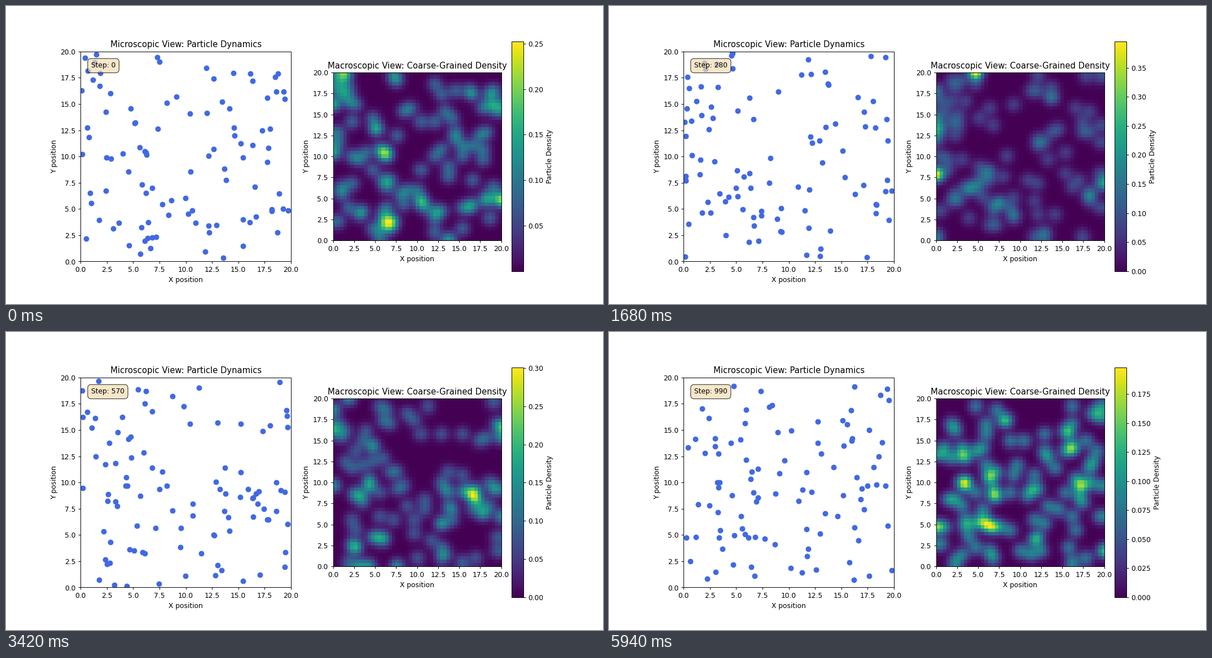
These frames come from a looping animation (1058 px wide and 529 px high, 6000 ms). A matplotlib script:

```python
import numpy as np
import matplotlib.pyplot as plt
from matplotlib.animation import FuncAnimation

COUNT = 100
BOX = 20.0
EDGES = np.linspace(0, BOX, 50)
BINS = len(EDGES) - 1
SMOOTHING = 1.5
DT = 0.02
FRICTION = 1.0
TEMPERATURE = 1.0
STEPS_PER_FRAME = 10
FRAMES = 100


def simulate():
    """Langevin paths in a periodic box, one array of positions per frame."""
    np.random.seed(42)
    position = np.random.rand(COUNT, 2) * BOX
    velocity = np.random.randn(COUNT, 2) * np.sqrt(TEMPERATURE)
    kick = np.sqrt(2 * FRICTION * TEMPERATURE * DT)
    path = [position]
    for _ in range(1, FRAMES):
        for _ in range(STEPS_PER_FRAME):
            noise = np.random.randn(COUNT, 2)
            velocity = velocity * (1 - FRICTION * DT) + kick * noise
            position = (position + velocity * DT) % BOX
        path.append(position)
    return path


def smoothing_matrix():
    """Gaussian blur along one axis, mirrored at the walls."""
    radius = int(4 * SMOOTHING + 0.5)
    offsets = np.arange(-radius, radius + 1)
    weights = np.exp(-offsets ** 2 / (2 * SMOOTHING ** 2))
    weights /= weights.sum()
    mirrored = np.pad(np.eye(BINS), ((radius, radius), (0, 0)), mode="symmetric")
    return sum(w * mirrored[i:i + BINS] for i, w in enumerate(weights))


BLUR = smoothing_matrix()
PATH = simulate()


def density(points):
    counts, _, _ = np.histogram2d(*points.T, bins=[EDGES, EDGES])
    return (BLUR @ counts @ BLUR.T).T


fig, (ax_micro, ax_macro) = plt.subplots(1, 2, figsize=(12, 6), dpi=88.17)

dots = ax_micro.scatter(*PATH[0].T, s=50, c="royalblue")
ax_micro.set(xlim=(0, BOX), ylim=(0, BOX), aspect="equal",
             title="Microscopic View: Particle Dynamics")
label = ax_micro.text(
    0.05, 0.95, "", transform=ax_micro.transAxes, va="top",
    bbox=dict(boxstyle="round,pad=0.5", facecolor="wheat", alpha=0.7))

image = ax_macro.imshow(density(PATH[0]), origin="lower", cmap="viridis",
                        extent=(0, BOX, 0, BOX))
ax_macro.set_title("Macroscopic View: Coarse-Grained Density")
fig.colorbar(image, ax=ax_macro, label="Particle Density")

for ax in (ax_micro, ax_macro):
    ax.set(xlabel="X position", ylabel="Y position")


def update(frame):
    field = density(PATH[frame])
    dots.set_offsets(PATH[frame])
    image.set_data(field)
    image.set_clim(field.min(), field.max())
    label.set_text(f"Step: {frame * STEPS_PER_FRAME}")
    return dots, image, label


animation = FuncAnimation(fig, update, frames=FRAMES, interval=60,
                          repeat=True, repeat_delay=0)
plt.show()
```
